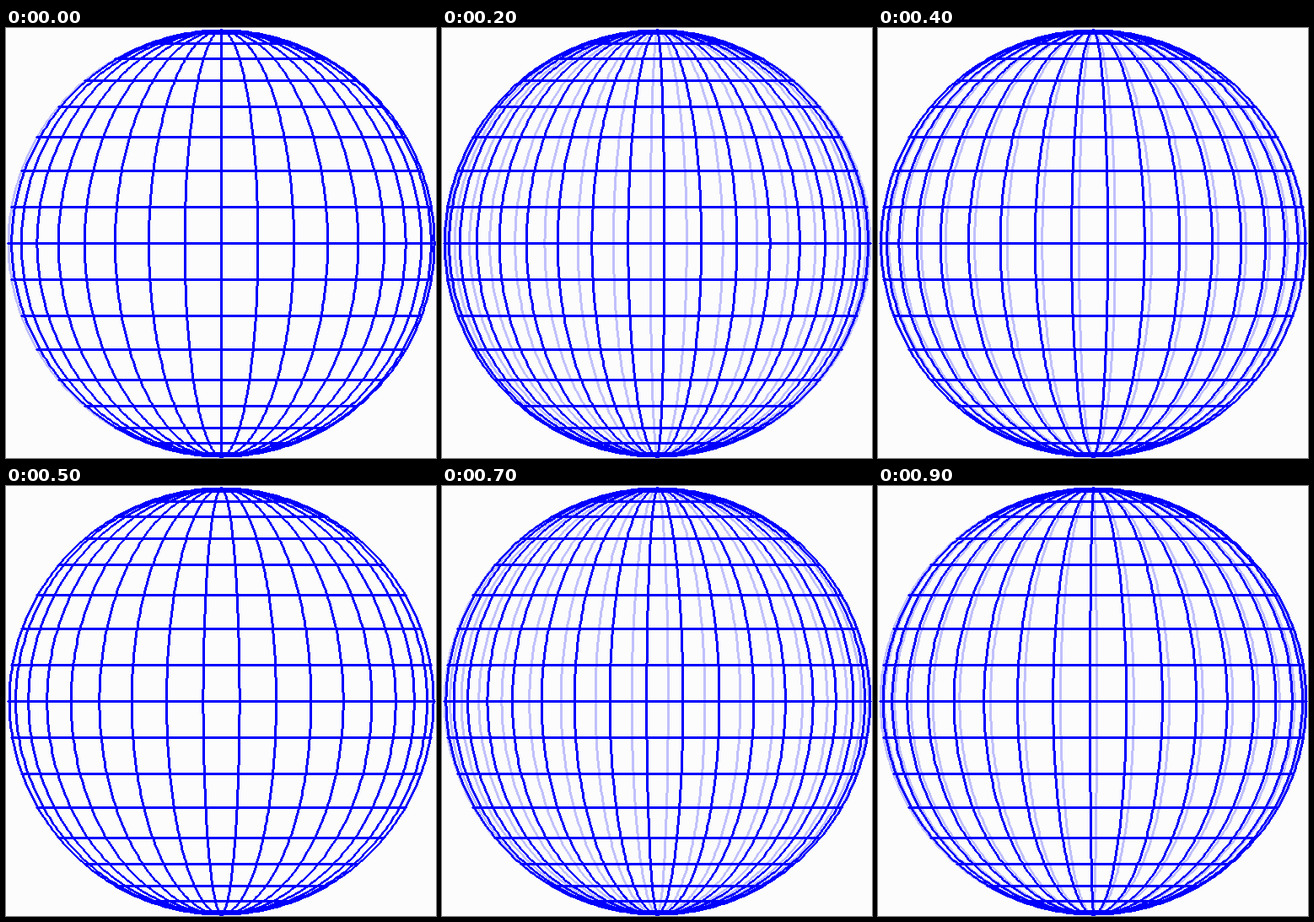
These frames come from a looping animation (510x510 px, 1000 ms). An HTML page with a canvas:

```html
<!DOCTYPE html>
<html>
<head>
<meta charset="utf-8">
<title>Turning globe</title>
<style>
html, body { margin: 0; width: 100%; height: 100%; overflow: hidden; background: #fcfcfc; }
canvas { display: block; }
</style>
</head>
<body>
<canvas id="globe" width="510" height="510"></canvas>
<script>
const SIZE = 510, MID = 255, R = 253, GRID = 10;
// Colours as ABGR words
const PAPER = 0xfffcfcfc, FRONT = 0xfffc0000, BACK = 0xfffcc0c0;

const ctx = document.getElementById('globe').getContext('2d');
const image = ctx.createImageData(SIZE, SIZE);
const pixels = new Uint32Array(image.data.buffer);
const sin = deg => Math.sin(deg * Math.PI / 180);
const cos = deg => Math.cos(deg * Math.PI / 180);
const snap = v => MID + Math.trunc(v + Math.sign(v) * 1e-6);

// Three pixel wide pen without smoothing
function dot(x, y, color) {
  const i = y * SIZE + x;
  for (const d of [0, -1, 1, -SIZE, SIZE]) pixels[i + d] = color;
}

function line(x0, y0, x1, y1, color) {
  const n = Math.max(Math.abs(x1 - x0), Math.abs(y1 - y0), 1);
  for (let i = 0; i <= n; i++) {
    dot(Math.round(x0 + (x1 - x0) * i / n), Math.round(y0 + (y1 - y0) * i / n), color);
  }
}

function meridian(lon, color) {
  const point = lat => [snap(R * sin(lon) * cos(lat)), snap(R * sin(lat))];
  for (let lat = -90; lat < 90; lat++) line(...point(lat), ...point(lat + 1), color);
}

function parallel(lat) {
  const x = R * cos(lat), y = snap(R * sin(lat));
  line(snap(-x), y, snap(x), y, FRONT);
}

function draw(turn) {
  pixels.fill(PAPER);
  const lons = Array.from({ length: 36 }, (_, i) => i * GRID - 180 + turn);
  const isFront = lon => lon > -90 && lon <= 90;
  for (const lon of lons) if (!isFront(lon)) meridian(lon, BACK);
  for (const lon of lons) if (isFront(lon)) meridian(lon, FRONT);
  for (let lat = -90; lat <= 90; lat += GRID) parallel(lat);
  ctx.putImageData(image, 0, 0);
}

// One degree every 100 ms; the grid repeats after ten.
function tick() {
  draw(Math.floor(performance.now() % 1000 / 100));
  requestAnimationFrame(tick);
}
tick();
</script>
</body>
</html>
```
